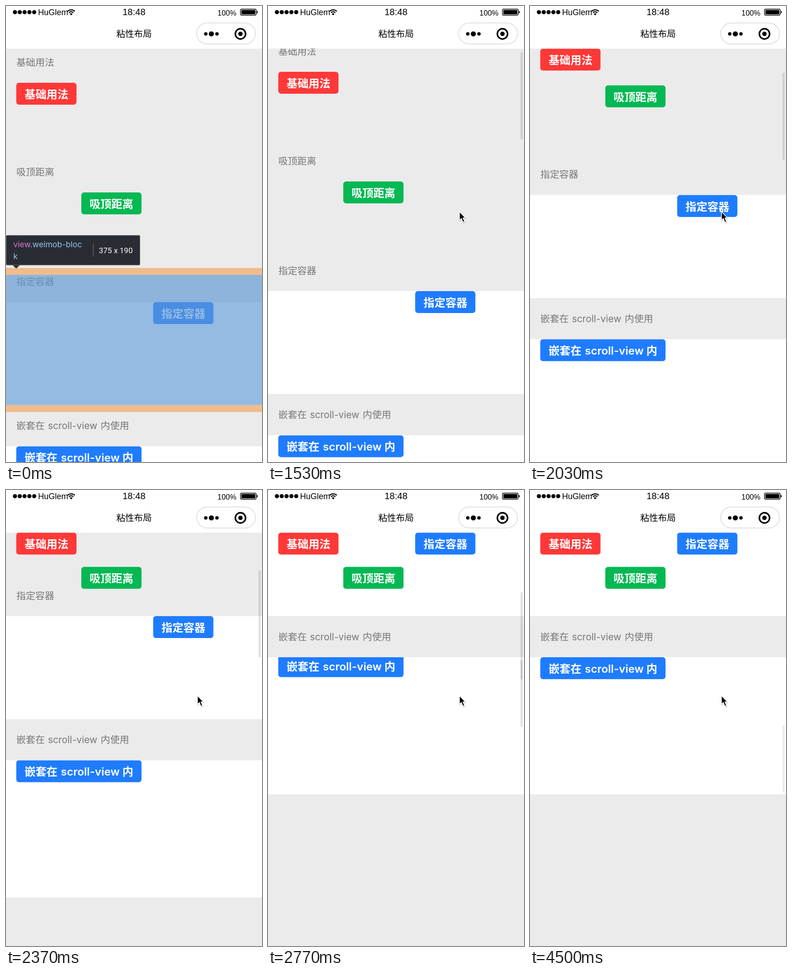
Animation of 561x998 px, one loop 4.66 s. Source, as an HTML page:

```html
<!DOCTYPE html>
<html lang="zh-CN">
<head>
<meta charset="utf-8">
<title>粘性布局</title>
<style>
  html, body { margin: 0; width: 100%; height: 100%; overflow: hidden; background: #ebebeb; }
  svg { display: block; width: 100%; height: 100%; }
  text { font-family: Inter, "Noto Sans CJK SC", "Noto Sans CJK", sans-serif; }
  .label text { font-size: 20.8px; fill: #777; }
  .btn text { font-size: 24px; font-weight: 600; fill: #fff; }
  .status { font-family: "Liberation Sans", Arial, sans-serif; }
  .tip { font-size: 17.5px; }
  .size { font: 17px Roboto, sans-serif; }
  .red { fill: #ff3838; }
  .green { fill: #04b853; }
  .blue { fill: #1f7cff; }
  .thumb { fill: #000; fill-opacity: .12; }
</style>
</head>
<body>
<svg viewBox="0 0 561 998" preserveAspectRatio="none">
  <defs>
    <clipPath id="viewClip"><rect y="963.5" width="561" height="300"/></clipPath>
  </defs>
  <rect width="561" height="998" fill="#ebebeb"/>

  <g id="page">
    <rect y="648" width="561" height="225.5" fill="#fff"/>
    <rect y="963.5" width="561" height="300" fill="#fff"/>
    <g class="label">
      <text x="22.7" y="130.8">基础用法</text>
      <text x="22.7" y="370.8">吸顶距离</text>
      <text x="22.7" y="610.8">指定容器</text>
      <text y="926.3"><tspan x="22.7">嵌套在</tspan><tspan x="92">scroll-view</tspan><tspan x="207.5">内使用</tspan></text>
    </g>
    <g clip-path="url(#viewClip)">
      <g class="btn" id="inner">
        <rect class="blue" x="22.5" y="963.5" width="274.5" height="48" rx="6"/>
        <text y="997.2"><tspan x="40.7">嵌套在</tspan><tspan x="120.3">scroll-view</tspan><tspan x="255">内</tspan></text>
      </g>
    </g>
  </g>

  <g class="btn" id="box">
    <rect class="blue" x="322.5" y="648" width="132" height="48" rx="6"/>
    <text x="340.7" y="682">指定容器</text>
  </g>
  <g class="btn" id="gap">
    <rect class="green" x="165" y="408" width="132" height="48" rx="6"/>
    <text x="183" y="442">吸顶距离</text>
  </g>
  <g class="btn" id="basic">
    <rect class="red" x="22.5" y="168" width="132" height="48" rx="6"/>
    <text x="40.7" y="202">基础用法</text>
  </g>

  <rect class="thumb" id="pageThumb" x="553.5" width="4.5" height="190.5"/>
  <rect class="thumb" id="viewThumb" x="553.5" width="4.5" height="146"/>

  <g id="inspect">
    <path d="M0 573.3H561V588.3H0ZM0 873.5H561V888.5H0Z" fill="#f5a55a" fill-opacity=".66"/>
    <rect y="588.3" width="561" height="285.2" fill="#5e98d3" fill-opacity=".66"/>
    <path d="M14 567L22.3 574.5L30.5 567Z" fill="#292c33"/>
    <rect x=".5" y="502" width="293" height="65" rx="2" fill="#292c33" stroke="#6d6f74"/>
    <text class="tip" fill="#8fc5f4"><tspan x="16" y="528" fill="#d874d8">view</tspan>.weimob-bloc<tspan x="16" y="553.5">k</tspan></text>
    <rect x="190.5" y="521" width="1.3" height="27" fill="#6a6d73"/>
    <text class="size" x="203.5" y="540.5" fill="#fff">375 x 190</text>
  </g>

  <g id="header">
    <rect width="561" height="93.3" fill="#fff"/>
    <path d="M19.6 13.5H62" stroke="#000" stroke-width="9.2" stroke-linecap="round" stroke-dasharray="0 10.55"/>
    <text class="status" x="70.3" y="19.6" font-size="18">HuGlem</text>
    <g fill="none" stroke="#000" stroke-width="2.2">
      <path d="M134.8 11.6A11.4 11.4 0 0 1 150.8 11.6"/>
      <path d="M137.9 14.7A7 7 0 0 1 147.7 14.7"/>
    </g>
    <path d="M142.8 20.4L139.7 17.2A4.4 4.4 0 0 1 145.9 17.2Z"/>
    <text class="status" x="255.5" y="20" font-size="20">18:48</text>
    <text class="status" x="463.5" y="21" font-size="16.2">100%</text>
    <rect x="513.7" y="6.7" width="34.6" height="13.6" rx="3" fill="none" stroke="#000" stroke-width="1.4"/>
    <rect x="515.8" y="8.8" width="30.4" height="9.4" rx="1.3"/>
    <path d="M549.6 10.8Q552 11.4 552 13.5T549.6 16.2Z"/>
    <text x="241.8" y="68.4" font-size="19.4" font-weight="500">粘性布局</text>
    <rect x="417.8" y="37.2" width="129" height="46" rx="23" fill="#fff" stroke="#d8d8d8" stroke-width="1.5"/>
    <circle cx="437.8" cy="61" r="3.8"/>
    <circle cx="450" cy="61" r="5.6"/>
    <circle cx="462.3" cy="61" r="3.8"/>
    <circle cx="513.8" cy="61" r="11.2" fill="none" stroke="#000" stroke-width="3.4"/>
    <circle cx="513.8" cy="61" r="4.8"/>
  </g>

  <g id="cursor" stroke-linejoin="round">
    <path id="arrow" d="M.8 1V20L5 16L8.5 24.3L12 22.8L8.6 14.7H14Z" transform="translate(.6 1.4)" fill="#000" stroke="#000" stroke-width="2.4" opacity=".18"/>
    <path d="M.8 1V20L5 16L8.5 24.3L12 22.8L8.6 14.7H14Z" stroke="#fff" stroke-width="1.5"/>
  </g>
</svg>

<script>
const LOOP = 4660, TOP = 93.3, PAGE_END = 597.5;
const $ = id => document.getElementById(id);

// Monotone cubic curve through [time, value] points
function track(...pts) {
  const n = pts.length;
  const d = i => (pts[i + 1][1] - pts[i][1]) / (pts[i + 1][0] - pts[i][0]);
  const slope = pts.map((p, i) => {
    if (i === 0 || i === n - 1) return 0;
    const a = d(i - 1), b = d(i);
    return a * b > 0 ? 2 * a * b / (a + b) : 0;
  });
  return t => {
    if (t <= pts[0][0]) return pts[0][1];
    if (t >= pts[n - 1][0]) return pts[n - 1][1];
    let i = 0;
    while (t >= pts[i + 1][0]) i++;
    const [t0, v0] = pts[i], [t1, v1] = pts[i + 1];
    const h = t1 - t0, u = (t - t0) / h, w = 1 - u;
    return v0 * (1 + 2 * u) * w * w + h * slope[i] * u * w * w
      + v1 * u * u * (3 - 2 * u) - h * slope[i + 1] * u * u * w;
  };
}

const scroll = track([1400, 0], [1600, 45], [1770, 112.5], [2030, 234], [2300, 304],
  [2370, 371], [2550, 525], [2740, PAGE_END]);
const viewThumbY = track([2740, 369], [2770, 372], [2950, 402], [3230, 423], [3400, 423],
  [3800, 505], [4000, 505], [4130, 516]);
const lag = track([2740, 0], [2770, 4.5], [2810, 0]);
const cursorX = track([420, 575], [500, 497], [830, 497], [1130, 424], [1270, 424], [1400, 418.7]);
const cursorY = track([420, 520], [500, 490], [830, 490], [1130, 437], [1270, 437], [1400, 449]);
const pageFade = track([3080, 1], [3230, 0]);

const move = (id, x, y) => $(id).setAttribute("transform", `translate(${x} ${y})`);
const show = (id, alpha) => $(id).setAttribute("opacity", +alpha);
const stick = (id, y, top, s) => move(id, 0, Math.max(y - s, top) - y);

function draw() {
  const t = performance.now() % LOOP, s = scroll(t);

  move("page", 0, -s);
  stick("basic", 168, TOP, s);
  stick("gap", 408, TOP + 75, s);
  stick("box", 648, TOP, s);
  move("inner", 0, -lag(t));

  $("pageThumb").setAttribute("y", 96 + s * .2144);
  show("pageThumb", s > 0 ? pageFade(t) : 0);
  $("viewThumb").setAttribute("y", viewThumbY(t));
  show("viewThumb", t < 2740 ? 0 : t < 4500 ? 1 : .66);

  show("inspect", t < 1400);
  show("cursor", t >= 430);
  move("cursor", cursorX(t), cursorY(t));
  requestAnimationFrame(draw);
}
draw();
</script>
</body>
</html>
```
